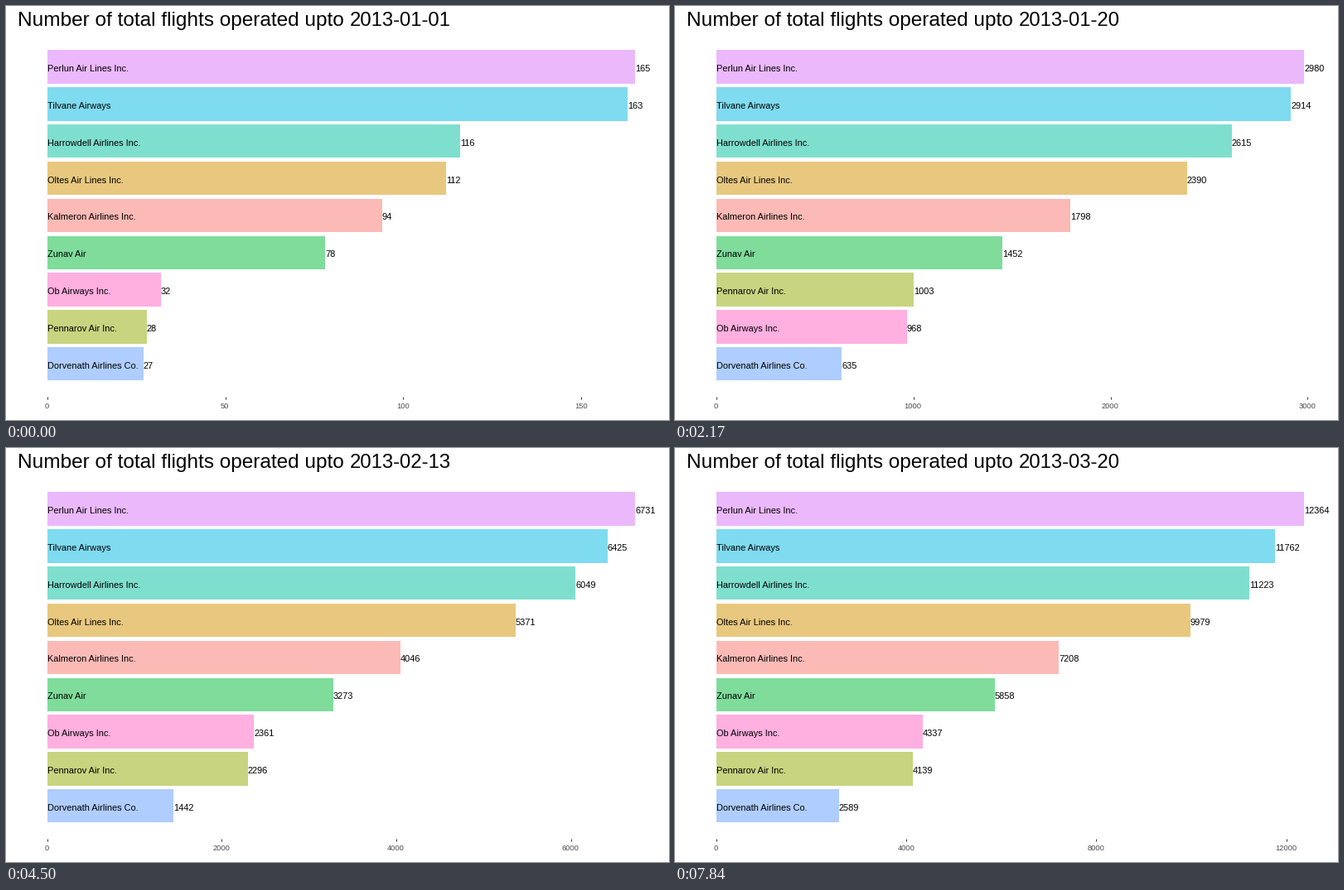
Write a matplotlib script that moves like this. It is 800 px wide and 500 px high and loops after 8 s.

```python
import math

import matplotlib.pyplot as plt
import numpy as np
from matplotlib.animation import FuncAnimation
from matplotlib.patches import Rectangle

W, H, DPI = 800, 500, 100
PX = 72 / DPI  # points per pixel
LEFT, SPAN = 49.95, 708.6  # bar origin and length of the longest bar
TOP, BAR, ROW = 53.3, 40.37, 44.85  # first bar, bar height, row pitch
FRAMES, LOOP, HOLD = 48, 8000, 2
DAYS_PER_STEP = 1.736
DATE_LAG = 0.15  # the title trails the bars slightly
LAST_DAY = 78
START = np.datetime64("2013-01-01")

# name, colour, first day's flights, daily rate, early boost, late growth
CARRIERS = [
    ("Perlun Air Lines Inc.", "#DB72FB", 165, 147.6, 3, 8.8),
    ("Tilvane Airways", "#00B9E3", 163, 140.5, 28, 8.2),
    ("Harrowdell Airlines Inc.", "#00C19F", 116, 133.4, -13.5, 9),
    ("Oltes Air Lines Inc.", "#D39200", 112, 117.8, 13, 8.7),
    ("Kalmeron Airlines Inc.", "#F8766D", 94, 89.5, 1, 1.7),
    ("Zunav Air", "#00BA38", 78, 72.3, 0, 1.8),
    ("Ob Airways Inc.", "#FF61C3", 32, 52.8, -24, 2.4),
    ("Pennarov Air Inc.", "#93AA00", 28, 51.3, 0, 1.4),
    ("Dorvenath Airlines Co.", "#619CFF", 27, 32, 0, 0.85),
]

plt.rcParams["font.family"] = "Liberation Sans"
fig = plt.figure(figsize=(W / DPI, H / DPI), dpi=DPI, facecolor="white")
ax = fig.add_axes([0, 0, 1, 1])
ax.set_xlim(0, W)
ax.set_ylim(H, 0)
ax.axis("off")


def label(x, y, text="", px=11, **style):
    return ax.text(x, y, text, fontsize=px * PX, va="baseline", **style)


def total(day, first, rate, boost, growth):
    """Flights operated from the first day up to the given day."""
    daily = rate + boost * math.exp(-day / 10) + growth * (day / LAST_DAY) ** 3
    return round(first + daily * day)


def tick_step(top):
    """Pick a round axis step by simplicity, coverage and density."""
    lo, hi = -0.05 * top, 1.05 * top
    best, choice = -math.inf, None
    for i, base in enumerate([1, 5, 2, 2.5, 4, 3]):
        for power in range(1, 5):
            step = base * 10**power
            for count in range(2, 10):
                end = step * (count - 1)
                miss = (hi - end) ** 2 + lo**2
                cover = 1 - 0.5 * miss / (0.1 * (hi - lo)) ** 2
                ratio = (max(hi, end) - lo) / (4 * step)
                density = 2 - max(ratio, 1 / ratio)
                score = 0.25 * (1 - i / 5) + 0.2 * cover + 0.5 * density
                if score > best:
                    best, choice = score, step
    return choice


label(13.8, 24, "Number of total flights operated upto", 24.4)
date = label(414.6, 24, px=23.9)

bars, names, counts = [], [], []
for name, color, *_ in CARRIERS:
    bar = Rectangle((0, 0), 0, 0, facecolor=color, alpha=0.5, linewidth=0)
    bars.append(ax.add_patch(bar))
    names.append(label(LEFT, 0, name, color="black"))
    counts.append(label(LEFT, 0, color="black"))

ticks = []
for _ in range(10):
    (mark,) = ax.plot([], [], color="#333333", lw=PX, solid_capstyle="butt")
    ticks.append((mark, label(0, 486, px=9.3, color="#4D4D4D", ha="center")))


def draw_axis(top):
    step = tick_step(top)
    for i, (mark, text) in enumerate(ticks):
        value = i * step
        shown = value <= 1.05 * top
        mark.set_visible(shown)
        text.set_visible(shown)
        if shown:
            x = LEFT + SPAN * value / top - 0.5
            mark.set_data([math.floor(x) + 0.5] * 2, [472, 475])
            text.set_x(x)
            text.set_text(f"{value:.0f}")


def update(frame):
    elapsed = DAYS_PER_STEP * max(0, frame - HOLD)
    date.set_text(str(START + np.timedelta64(round(elapsed), "D")))

    day = round(elapsed + DATE_LAG)
    totals = [total(day, *numbers) for _, _, *numbers in CARRIERS]
    top = max(totals)
    order = sorted(range(len(totals)), key=lambda i: -totals[i])
    x0 = round(LEFT)
    for rank, i in enumerate(order):
        y = TOP + ROW * rank
        y0, y1, base = round(y), round(y + BAR), round(y + 25.75)
        x1 = round(LEFT + SPAN * totals[i] / top)
        bars[i].set_bounds(x0, y0, x1 - x0, y1 - y0)
        names[i].set_y(base)
        counts[i].set_position((x1, base))
        counts[i].set_text(str(totals[i]))
    draw_axis(top)
    return []


anim = FuncAnimation(fig, update, frames=FRAMES, init_func=lambda: update(0),
                     interval=LOOP / FRAMES, repeat=True, repeat_delay=0, blit=False)
plt.show()
```
